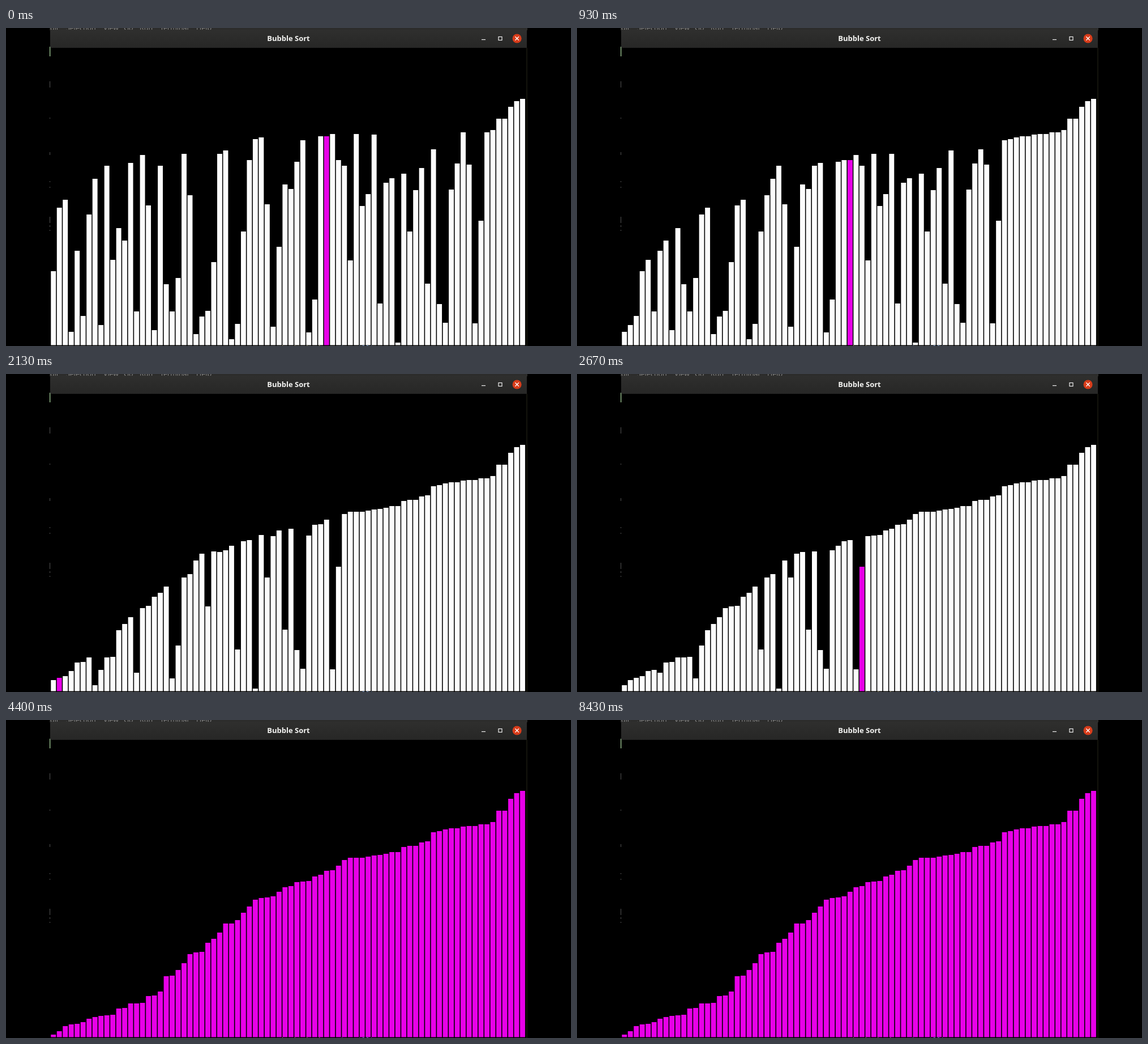
Write an HTML page that moves like this. It is 998 px wide and 561 px high and loops after 8610 ms.

```html
<!DOCTYPE html>
<html lang="en">
<head>
<meta charset="utf-8">
<title>Bubble Sort</title>
<style>
  html, body { margin: 0; width: 100%; height: 100%; overflow: hidden; background: #000; }
  svg { display: block; width: 998px; height: 561px; }
  .menu { font: 12.5px "Open Sans", sans-serif; fill: #8c8c8c; }
  .code { font: 12px "DejaVu Sans Mono", monospace; }
  .title { font: bold 13px "Open Sans", sans-serif; fill: #f4f4f2; text-anchor: middle; }
</style>
</head>
<body>
<svg viewBox="0 0 998 561">
  <defs>
    <linearGradient id="bar" x1="0" y1="0" x2="0" y2="1">
      <stop offset="0" stop-color="#2f2f2e"/>
      <stop offset="1" stop-color="#272726"/>
    </linearGradient>
    <clipPath id="desk"><rect x="77" width="844" height="561"/></clipPath>
  </defs>
  <rect width="998" height="561"/>
  <g clip-path="url(#desk)">
    <rect x="77" width="844" height="4" fill="#2c2c2b"/>
    <g class="menu" id="menu"></g>
    <g class="code">
      <text x="352" y="569" fill="#4a78a8">in</text>
      <text x="442" y="569" fill="#b8b070">generate list of</text>
      <text x="570" y="569" fill="#5a80b8">numbers(80)</text>
    </g>
    <g id="edge" fill="#4c4c4c"></g>
    <rect x="77" y="33" width="1.6" height="17" fill="#a5cf9a"/>
    <rect x="919" y="35" width="2" height="526" fill="#14140c"/>
  </g>
  <rect x="78.5" y="35" width="840.5" height="525"/>
  <path d="M78 35V3H920V35Z" fill="url(#bar)"/>
  <text class="title" x="499" y="23.3">Bubble Sort</text>
  <path d="M840 20.5h7" stroke="#eee" stroke-width="1.2"/>
  <rect x="870" y="15.5" width="6" height="6" fill="none" stroke="#eee" stroke-width="1.2"/>
  <circle cx="902.6" cy="18.5" r="8" fill="#d83c1a"/>
  <path d="M899.4 15.3l6.4 6.4m0-6.4l-6.4 6.4" stroke="#fff" stroke-width="1.3"/>
  <g id="bars"></g>
</svg>
<script>
const LOOP = 8610;
const FLOOR = 559.5;
const WHITE = "#fdfdfd", MAGENTA = "#e800e8";
const DONE_TICK = 118;

// Bar tops at the start of the loop, part-way through a pass.
const START = [
  429, 317, 303, 536, 393, 508, 329, 266, 524, 243, 409, 353, 375, 238, 500, 224,
  313, 533, 243, 452, 500, 441, 222, 295, 540, 509, 499, 413, 222, 216, 549, 522,
  359, 233, 196, 193, 311, 527, 386, 276, 284, 236, 198, 537, 479, 191, 191, 187,
  233, 243, 410, 187, 314, 293, 188, 486, 273, 265, 555, 257, 359, 286, 247, 451,
  214, 487, 520, 285, 239, 184, 241, 521, 340, 184, 180, 160, 160, 139, 129, 125
];
const START_PASS = 7, START_INDEX = 46;

// [tick, comparisons made]
const PACE = [[0, 0], [17, 350], [40, 882], [64, 1407], [98, 2160], [117, 2578]];

const byId = id => document.getElementById(id);

function add(parent, tag, attrs, text = "") {
  const node = document.createElementNS("http://www.w3.org/2000/svg", tag);
  for (const key in attrs) node.setAttribute(key, attrs[key]);
  node.textContent = text;
  return parent.appendChild(node);
}

[["dit", 78], ["Selection", 106], ["View", 172], ["Go", 208],
 ["Run", 236], ["Terminal", 272], ["Help", 336]]
  .forEach(([word, x]) => add(byId("menu"), "text", { x, y: 3.6 }, word));

[[94, 11], [158, 2], [219, 5], [270, 2], [280, 2], [333, 11], [348, 3], [356, 2]]
  .forEach(([y, height]) => add(byId("edge"), "rect", { x: 77, y, width: 1.2, height }));

const bars = START.map((_, i) =>
  add(byId("bars"), "rect", { x: (79.3 + 10.49 * i).toFixed(2), width: 8.9 }));

// Thirty ticks a second, on a 30 / 40 / 30 ms grid.
function tickAt(ms) {
  const rest = ms % 100;
  return Math.floor(ms / 100) * 3 + (rest < 30 ? 0 : rest < 70 ? 1 : 2);
}

function comparisonsAt(tick) {
  const next = PACE.findIndex(([t]) => t > tick);
  if (next < 0) return PACE[PACE.length - 1][1];
  const [t0, n0] = PACE[next - 1], [t1, n1] = PACE[next];
  return Math.round(n0 + (n1 - n0) * (tick - t0) / (t1 - t0));
}

function sortState(comparisons) {
  const tops = START.slice();
  let pass = START_PASS, cursor = START_INDEX;
  for (let n = 0; n < comparisons; n++) {
    if (++cursor > tops.length - 2 - pass) {
      pass++;
      cursor = 0;
    }
    if (tops[cursor] < tops[cursor + 1]) {
      [tops[cursor], tops[cursor + 1]] = [tops[cursor + 1], tops[cursor]];
    }
  }
  return { tops, cursor };
}

let shownTick = -1;

function render(ms) {
  const tick = Math.min(tickAt(ms), DONE_TICK);
  if (tick === shownTick) return;
  shownTick = tick;
  const done = tick === DONE_TICK;
  const { tops, cursor } = sortState(comparisonsAt(tick));
  if (done) tops.sort((a, b) => b - a);
  bars.forEach((bar, i) => {
    bar.setAttribute("y", tops[i]);
    bar.setAttribute("height", FLOOR - tops[i]);
    bar.setAttribute("fill", done || i === cursor ? MAGENTA : WHITE);
  });
}

const startTime = performance.now();
function loop() {
  render((performance.now() - startTime) % LOOP);
  requestAnimationFrame(loop);
}
loop();
</script>
</body>
</html>
```
